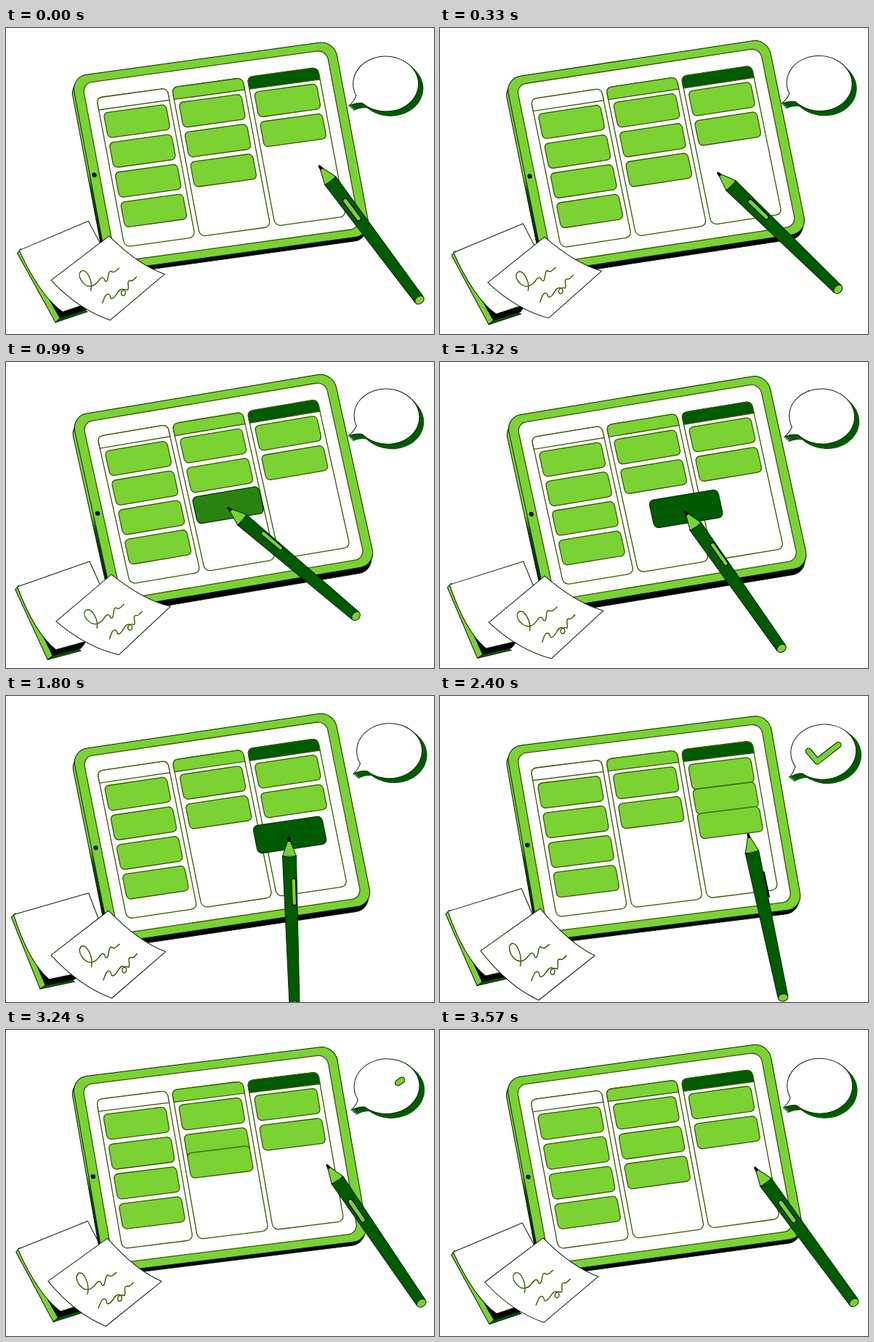
Write an HTML page that moves like this. It is 589 px wide and 422 px high and loops after 3600 ms.

```html
<!DOCTYPE html>
<html lang="en">
<head>
<meta charset="utf-8">
<title>Task board</title>
<style>
  html, body { margin: 0; width: 100%; height: 100%; overflow: hidden; background: #fff; }
  svg { display: block; width: 100vw; height: 100vh; }
  .lime { fill: #7ad233; }
  .dark { fill: #005a00; }
  .paper { fill: #fff; }
  .line { stroke: #3a5a00; stroke-width: 1.3; }
  .edge { stroke: #0a2600; stroke-width: 1; stroke-linejoin: round; }
  .ink { fill: none; stroke: #3a5a00; stroke-width: 1.4; stroke-linecap: round; }
  .tick { fill: none; stroke-linecap: round; stroke-linejoin: round; }
</style>
</head>
<body>
<svg viewBox="0 0 589 422" preserveAspectRatio="none">
  <defs>
    <linearGradient id="side" gradientUnits="userSpaceOnUse" x1="0" y1="-33" x2="0" y2="235">
      <stop offset=".48" stop-color="#7ad233"/>
      <stop offset=".56" stop-color="#005a00"/>
      <stop offset=".76" stop-color="#003000"/>
      <stop offset=".86" stop-color="#000"/>
    </linearGradient>
  </defs>

  <g id="pad">
    <path class="lime edge" d="M21 304L16.500 310L68 405.500L76 400Z"/>
    <path class="dark edge" d="M68 405.500L112 391L106 387L74 400Z"/>
    <path d="M21 306L74 400L112 388L130 360Z"/>
    <path class="paper edge" d="M19 306L114 266L150 335L135 372L78 391C58 377 38 348 19 306Z"/>
  </g>

  <rect id="back" class="edge" x="-28.500" y="-33" width="363" height="267.500" rx="21" fill="url(#side)"/>
  <g id="tablet">
    <rect class="lime edge" x="-28.500" y="-33" width="363" height="267.500" rx="21"/>
    <rect class="paper line" x="-15.500" y="-22" width="337" height="245.500" rx="13"/>
    <circle cx="-22.500" cy="103" r="3.100"/>
  </g>

  <g id="sheet">
    <path class="paper edge" d="M142 287Q183 327 219 339L144 402.500Q100 388 62 348Z"/>
    <path class="ink" d="M117 362C120 350 112 332 104 335C96 341 107 357 117 356C128 354 127 345 133 344C138 345 134 350 139 349C142 345 140 337 144 335C149 338 150 336 156 331"/>
    <path class="ink" d="M133 379C136 371 138 365 142 367C146 370 142 375 148 372C153 369 155 359 161 360C168 362 164 371 160 368C156 362 164 359 168 361C171 357 165 348 172 348C175 350 177 345 180 343"/>
  </g>

  <g id="bubble">
    <g id="shell"></g>
    <g id="mark">
      <path class="tick" pathLength="1" stroke="#123c00" stroke-width="9" d="M-20 -2L-9.300 13L21.500 -7"/>
      <path class="tick" pathLength="1" stroke="#7ad233" stroke-width="6.600" d="M-20 -2L-9.300 13L21.500 -7"/>
    </g>
  </g>

  <rect id="card" class="line" x="-43" y="-17.250" width="86" height="34.500" rx="6"/>

  <g id="pen">
    <rect id="bump" x="55" y="-2" width="37" height="4" rx="1.500"/>
    <path class="lime edge" d="M0 0L26 -9.500V9.500Z"/>
    <path d="M-1.500 0L1 -1.700L6 -2.200V2.200L1 1.700Z"/>
    <path class="dark edge" d="M25 -9.500C28 -5 28 5 25 9.500L230 7V-7Z"/>
    <ellipse class="lime edge" cx="231" cy="0" rx="5" ry="6.800"/>
    <rect id="slot" class="lime" stroke="#000" stroke-width="1.300" x="57" width="37"/>
  </g>
</svg>
<script>
const LOOP = 3600;
const LIME = [122, 210, 51], DARK = [0, 90, 0];
const $ = id => document.getElementById(id);

function add(parent, tag, attrs) {
  const el = document.createElementNS('http://www.w3.org/2000/svg', tag);
  for (const k in attrs) el.setAttribute(k, attrs[k]);
  return parent.appendChild(el);
}

// One slow wave per loop: rest value, reach, phase in degrees.
const sway = (t, [rest, reach, phase]) =>
  rest + reach * Math.cos(2 * Math.PI * t / LOOP - phase * Math.PI / 180);
const clamp = x => Math.min(1, Math.max(0, x));
const ease = (t, from, to) => {
  const p = clamp((t - from) / (to - from));
  return p * p * (3 - 2 * p);
};
const mix = (a, b, w) => a.map((v, i) => v + (b[i] - v) * w);

// Floating sheets: three corners as drawn, and the sway of each corner's x and y.
const board = {
  corners: [0, 0, 305, 0, 0, 205],
  waves: [[125, 0.7, 130], [100, 4.2, 150], [428.4, 0.5, 280], [56.5, 5.6, 248], [164.8, 6, 105], [304.6, 3, 155]]
};
const pad = {
  corners: [18, 306, 114, 266, 68, 405],
  waves: [[13.3, 4.3, 26], [304, 7, 68], [113.5, 1.6, 95], [269, 6.2, 116], [57.5, 10.6, 8], [404.5, 5.8, 80]]
};
const sheet = {
  corners: [142, 287, 219, 339, 62, 348],
  waves: [[141.5, 3.8, 84], [291.5, 4.6, 170], [219, 7.3, 95], [346, 12, 237], [62, 7, 90], [352.7, 6.4, 138]]
};
const bubble = { x: [524.7, 2.9, 212], y: [75.6, 1.4, 300], turn: [0, 5.2, 80] };
const thickness = [6.5, 1.8, 115];

// Stops of the pen: time, tip x, tip y, angle.
const penStops = [
  [0, 431, 190, 53.3], [660, 325, 208, 35.4], [950, 304, 201, 39], [1320, 337, 206, 54.8],
  [1800, 389, 195, 88], [2400, 424, 190, 78], [2910, 437, 185, 58.6]];

// Smooth closed path through the stops.
function penAt(t) {
  const n = penStops.length;
  const i = penStops.findLastIndex(s => s[0] <= t);
  const stop = k => {
    const [time, ...pose] = penStops[(k + n) % n];
    return [time + LOOP * Math.floor(k / n), ...pose];
  };
  const [p, a, b, q] = [i - 1, i, i + 1, i + 2].map(stop);
  const span = b[0] - a[0], s = (t - a[0]) / span;
  return [1, 2, 3].map(c => {
    const m = (b[c] - p[c]) / (b[0] - p[0]) * span;
    const k = (q[c] - a[c]) / (q[0] - a[0]) * span;
    const d = a[c] - b[c];
    return a[c] + s * (m + s * (-3 * d - 2 * m - k + s * (2 * d + m + k)));
  });
}

// Affine matrix taking the drawn corners to their swaying places.
function affine({ corners: p, waves }, t) {
  const q = waves.map(w => sway(t, w));
  const x1 = p[2] - p[0], y1 = p[3] - p[1], x2 = p[4] - p[0], y2 = p[5] - p[1];
  const det = x1 * y2 - x2 * y1;
  const solve = k => {
    const d1 = q[2 + k] - q[k], d2 = q[4 + k] - q[k];
    const a = (d1 * y2 - d2 * y1) / det, c = (d2 * x1 - d1 * x2) / det;
    return [a, c, q[k] - a * p[0] - c * p[1]];
  };
  const [a, c, e] = solve(0), [b, d, f] = solve(1);
  return [a, b, c, d, e, f];
}

const place = (el, m) => el.setAttribute('transform', `matrix(${m.join()})`);
const at = (m, [x, y]) => [m[0] * x + m[2] * y + m[4], m[1] * x + m[3] * y + m[5]];
const show = (el, on) => { el.style.display = on ? '' : 'none'; };
const slotAt = (col, row) => [48.5 + 104 * col, 38.7 + 41 * row];

// Board columns
const tablet = $('tablet');
let lastCard;
[4, 2, 2].forEach((count, col) => {
  const x = 104 * col, head = ['paper', 'lime', 'dark'][col];
  add(tablet, 'rect', { class: 'paper line', x, y: 0, width: 97.5, height: 205, rx: 8 });
  add(tablet, 'path', { class: head + ' line', d: `M${x} 16.5V8Q${x} 0 ${x + 8} 0H${x + 89.5}Q${x + 97.5} 0 ${x + 97.5} 8V16.5Z` });
  for (let row = 0; row < count; row++) {
    const [cx, cy] = slotAt(col, row);
    lastCard = add(tablet, 'rect', { class: 'lime line', x: cx - 43, y: cy - 17.25, width: 86, height: 34.5, rx: 6 });
  }
});

// Speech bubble with its thickness
const BUBBLE = 'M-31 28A45 38 0 1 0 -40 17.500Q-43 26 -50 32Q-40 27 -31 28Z';
for (let k = 4; k >= 0; k--)
  add($('shell'), 'path', {
    class: k ? 'dark' : 'paper edge', stroke: '#005a00', d: BUBBLE,
    transform: `translate(${k * 1.6} ${k * 1.5})`
  });

function drawPen(t, [x, y, angle]) {
  $('pen').setAttribute('transform', `translate(${x} ${y}) rotate(${angle})`);
  // The barrel makes one full roll per loop.
  const roll = 0.5 * ease(t, 0, 600) + (2 * Math.PI - 0.5) * ease(t, 1950, 3400);
  const face = Math.cos(roll), off = -Math.sin(roll) * 9.5;
  const slot = $('slot'), half = 3.3 * Math.max(face, 0);
  slot.setAttribute('y', off - half);
  slot.setAttribute('height', 2 * half);
  slot.setAttribute('rx', half);
  show(slot, face > 0.25);
  $('bump').setAttribute('transform', `translate(0 ${off})`);
  show($('bump'), Math.abs(face) < 0.5);
}

function drawCard(t, m, tip) {
  const tuck = 41 * ease(t, 2306, 2546);
  const bump = 10 * Math.sin(Math.PI * clamp((t - 2306) / 394));
  lastCard.setAttribute('transform', `translate(0 ${-bump})`);

  const held = ease(t, 900, 1050) * (1 - ease(t, 2020, 2200));
  const [x3, y3] = slotAt(2, 2);
  const home = t < 1500 ? slotAt(1, 2)
    : t < 2800 ? [x3, y3 - tuck]
    : mix(slotAt(1, 1), slotAt(1, 2), ease(t, 3080, 3360));
  const [x, y] = mix(at(m, home), [tip[0] + 1.5, tip[1] - 3.5], held);
  const size = 1 + 0.11 * held;
  const card = $('card');
  place(card, [...m.slice(0, 4).map(v => v * size), x, y]);
  card.style.fill = `rgb(${mix(LIME, DARK, held).map(Math.round)})`;
  card.style.stroke = held > 0.5 ? '#003c00' : '';
  show(card, t < 2600 || t > 3080);
}

function draw(t) {
  const m = affine(board, t);
  place(tablet, m);
  place($('back'), [...m.slice(0, 4), m[4] - 2, m[5] + sway(t, thickness)]);
  place($('pad'), affine(pad, t));
  place($('sheet'), affine(sheet, t));
  $('bubble').setAttribute('transform',
    `translate(${sway(t, bubble.x)} ${sway(t, bubble.y)}) rotate(${sway(t, bubble.turn)})`);

  const shown = ease(t, 2030, 2300), gone = ease(t, 3030, 3300);
  const mark = $('mark');
  show(mark, shown > 0 && gone < 1);
  mark.setAttribute('stroke-dasharray', `${shown - gone} 2`);
  mark.setAttribute('stroke-dashoffset', -gone);

  const pen = penAt(t);
  drawCard(t, m, pen);
  drawPen(t, pen);
}

const start = performance.now();
function tick() {
  draw((performance.now() - start) % LOOP);
  requestAnimationFrame(tick);
}
tick();
</script>
</body>
</html>
```
